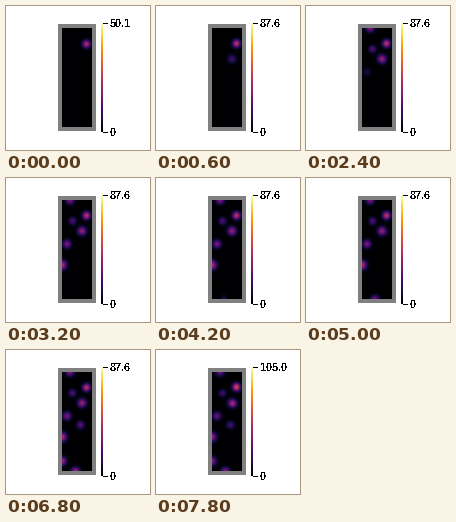
Recreate the animation shown at these times as a matplotlib script. Size 144 by 144 pixels, loop 8000 ms.

```python
import numpy as np
import matplotlib.pyplot as plt
from matplotlib.animation import FuncAnimation
from matplotlib.patches import Rectangle

SIZE, STEP, FRAMES = 144, 200, 40
LEFT, RIGHT, TOP, BOTTOM = 56, 86, 22, 121
BAR_TOP, BAR_BOTTOM = 17, 126

# centre, strength, first and last growth time in seconds
SPOTS = [
    (80.5 + 38j, 22, 0, 0),
    (80.5 + 37j, 21, 0.2, 0.2),
    (76 + 53j, 33, 0.6, 0.8),
    (64 + LEFT * 0j + TOP * 1j, 29, 1.2, 1.6),
    (66.5 + 43j, 20, 1.8, 2.0),
    (61 + 66j, 28, 2.4, 2.8),
    (LEFT + 87j, 38, 3.0, 3.2),
    (68 + BOTTOM * 1j, 20, 4.2, 4.4),
    (71 + BOTTOM * 1j, 20, 5.0, 5.2),
    (LEFT + 111j, 34, 5.6, 6.2),
    (74.5 + 75j, 22, 6.6, 6.8),
    (77.5 + 54j, 14, 7.4, 7.4),
    (80.5 + 36j, 18, 7.8, 7.8),
]

xs, ys = np.meshgrid(np.arange(LEFT, RIGHT) + 0.5,
                     np.arange(TOP, BOTTOM) + 0.5)
grid = xs + 1j * ys


def blob(centre, strength):
    width = 2 + strength / 30
    return strength * np.exp(-0.5 * (abs(grid - centre) / width) ** 2)


def growth(ms, first, last):
    """Equal steps, the first at `first` and the last at `last`."""
    first, last = round(first * 1000), round(last * 1000)
    return np.clip((ms - first + STEP) / (last - first + STEP), 0, 1)


def field(ms):
    return sum(blob(centre, strength) * growth(ms, first, last)
               for centre, strength, first, last in SPOTS)


def peak(ms):
    if ms < 200:
        return 50.1
    return 87.6 if ms < 7800 else 105.0


plt.rcParams.update({
    "font.family": "Liberation Sans",
    "text.antialiased": False,
    "text.hinting": "native",
    "text.hinting_factor": 1,
})
fig = plt.figure(figsize=(2, 2), dpi=72, facecolor="white")
ax = fig.add_axes([0, 0, 1, 1])
ax.axis("off")


def rect(x, y, w, h, color):
    ax.add_patch(Rectangle((x, y), w, h, fc=color, lw=0,
                           antialiased=False, zorder=0))


def picture(data, x0, x1, y0, y1):
    return ax.imshow(data, cmap="inferno", vmin=0, vmax=1, zorder=2,
                     extent=(x0, x1, y1, y0), interpolation="nearest")


def label(y, text):
    return ax.text(104, y, text, size=11, weight="bold", color="black",
                   ha="left", va="center_baseline")


rect(52, 18, 38, 107, "#808080")
heat = picture(field(0) / peak(0), LEFT, RIGHT, TOP, BOTTOM)
ramp = np.linspace(1, 0, BAR_BOTTOM - BAR_TOP)[:, None]
picture(ramp, 95, 97, BAR_TOP, BAR_BOTTOM)
for tick in (BAR_TOP, BAR_BOTTOM):
    rect(97, tick - 0.5, 5, 1, "black")
top = label(BAR_TOP, "50.1")
label(BAR_BOTTOM, "0")
ax.set(xlim=(0, SIZE), ylim=(SIZE, 0), aspect="auto")


def update(i):
    ms = i * STEP
    heat.set_data(field(ms) / peak(ms))
    top.set_text(f"{peak(ms):.1f}")
    return heat, top


anim = FuncAnimation(fig, update, frames=FRAMES, interval=STEP,
                     repeat=True, repeat_delay=0)
plt.show()
```
